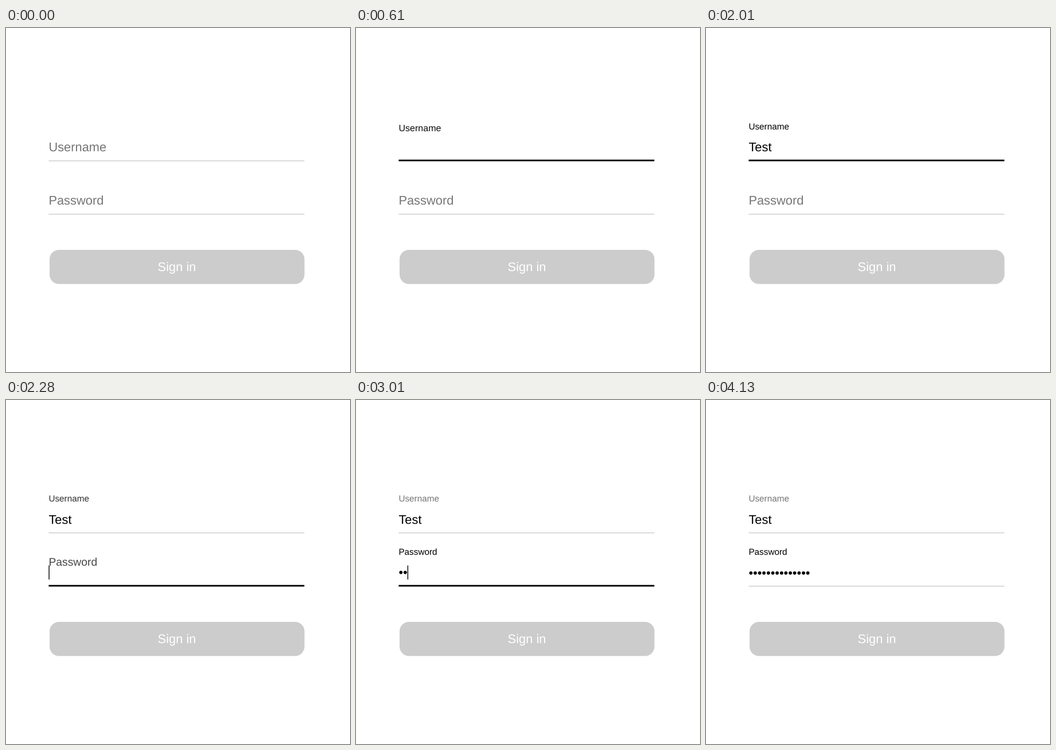
An HTML page with a canvas for the animation above (4160 ms loop, 600 by 600 pixels).

```html
<!DOCTYPE html>
<html lang="en">
<head>
<meta charset="utf-8">
<title>Sign in form</title>
<style>
  html, body { margin: 0; width: 100%; height: 100%; overflow: hidden; background: #fff; }
  canvas { display: block; width: 600px; height: 600px; }
</style>
</head>
<body>
<canvas id="stage"></canvas>
<script>
const LOOP = 4160;
const SIZE = 21.85;
const LEFT = 74.4, WIDTH = 446;
const GREY = 117;
const FONT = `${SIZE}px "Liberation Sans", Arial, sans-serif`;

const dpr = window.devicePixelRatio || 1;
const canvas = document.getElementById('stage');
canvas.width = canvas.height = 600 * dpr;
const ctx = canvas.getContext('2d');

// Times at which each character arrives, and spans in which the caret shows.
const fields = [
  {
    label: 'Username', top: 0, focus: 15, blur: 2040,
    text: 'Test', keys: [1010, 1210, 1310, 1510],
    caret: [[15, 515], [1010, 2010]]
  },
  {
    label: 'Password', top: 93, focus: 2040, blur: 4130,
    text: '•'.repeat(14),
    keys: [2950, 3010, ...burst(3210, 66, 6), ...burst(3740, 60, 4), 4070, 4100],
    caret: [[2040, 2650], [2950, 4130]]
  }
];

function burst(start, gap, count) {
  return Array.from({ length: count }, (_, i) => start + i * gap);
}

// cubic-bezier(.25, .1, .25, 1), solved by bisection
function ease(x) {
  if (x <= 0) return 0;
  if (x >= 1) return 1;
  const curve = (s, a, b) => 3 * (1 - s) * (1 - s) * s * a + 3 * (1 - s) * s * s * b + s * s * s;
  let lo = 0, hi = 1;
  for (let i = 0; i < 24; i++) {
    const mid = (lo + hi) / 2;
    if (curve(mid, 0.25, 0.25) < x) lo = mid; else hi = mid;
  }
  return curve(lo, 0.1, 1);
}

function rect(color, x, y, w, h) {
  ctx.fillStyle = color;
  ctx.fillRect(x, y, w, h);
}

function drawText(text, x, y, color, scale = 1) {
  ctx.save();
  ctx.translate(x, y);
  ctx.scale(scale, scale);
  ctx.fillStyle = color;
  ctx.fillText(text, 0, 0);
  ctx.restore();
}

function drawLabel(field, t) {
  const rise = ease((t - field.focus) / 1000);
  const fade = ease((t - field.blur) / 1000);
  const scale = 1 - 0.3 * rise;
  const shade = Math.round(GREY * (1 - rise + fade * rise));
  // the lift is scaled together with the text
  const y = 215 + field.top - 38 * rise * scale / 0.7;
  drawText(field.label, LEFT, y, `rgb(${shade},${shade},${shade})`, scale);
}

function drawField(field, t) {
  const active = t >= field.focus && t < field.blur;
  const typed = field.text.slice(0, field.keys.filter(k => t >= k).length);
  const line = active ? 2.8 : 1.4;

  rect(active ? '#000' : '#ccc', LEFT, field.top + 232.4 - line, WIDTH, line);
  drawLabel(field, t);
  drawText(typed, LEFT, field.top + (active ? 215 : 216), '#000');
  if (field.caret.some(([on, off]) => t >= on && t < off)) {
    rect('#000', LEFT + ctx.measureText(typed).width, field.top + 195.6, 1.4, 24.4);
  }
}

function drawButton() {
  ctx.fillStyle = '#ccc';
  ctx.beginPath();
  ctx.roundRect(76, 387, 444.6, 59.5, 16.4);
  ctx.fill();
  drawText('Sign in', 298 - ctx.measureText('Sign in').width / 2, 424, '#fff');
}

function draw(t) {
  ctx.setTransform(dpr, 0, 0, dpr, 0, 0);
  ctx.font = FONT;
  ctx.textRendering = 'geometricPrecision';
  rect('#fff', 0, 0, 600, 600);
  fields.forEach(field => drawField(field, t));
  drawButton();
}

let start;
function tick(now) {
  start ??= now;
  draw((now - start) % LOOP);
  requestAnimationFrame(tick);
}
draw(0);
requestAnimationFrame(tick);
</script>
</body>
</html>
```
